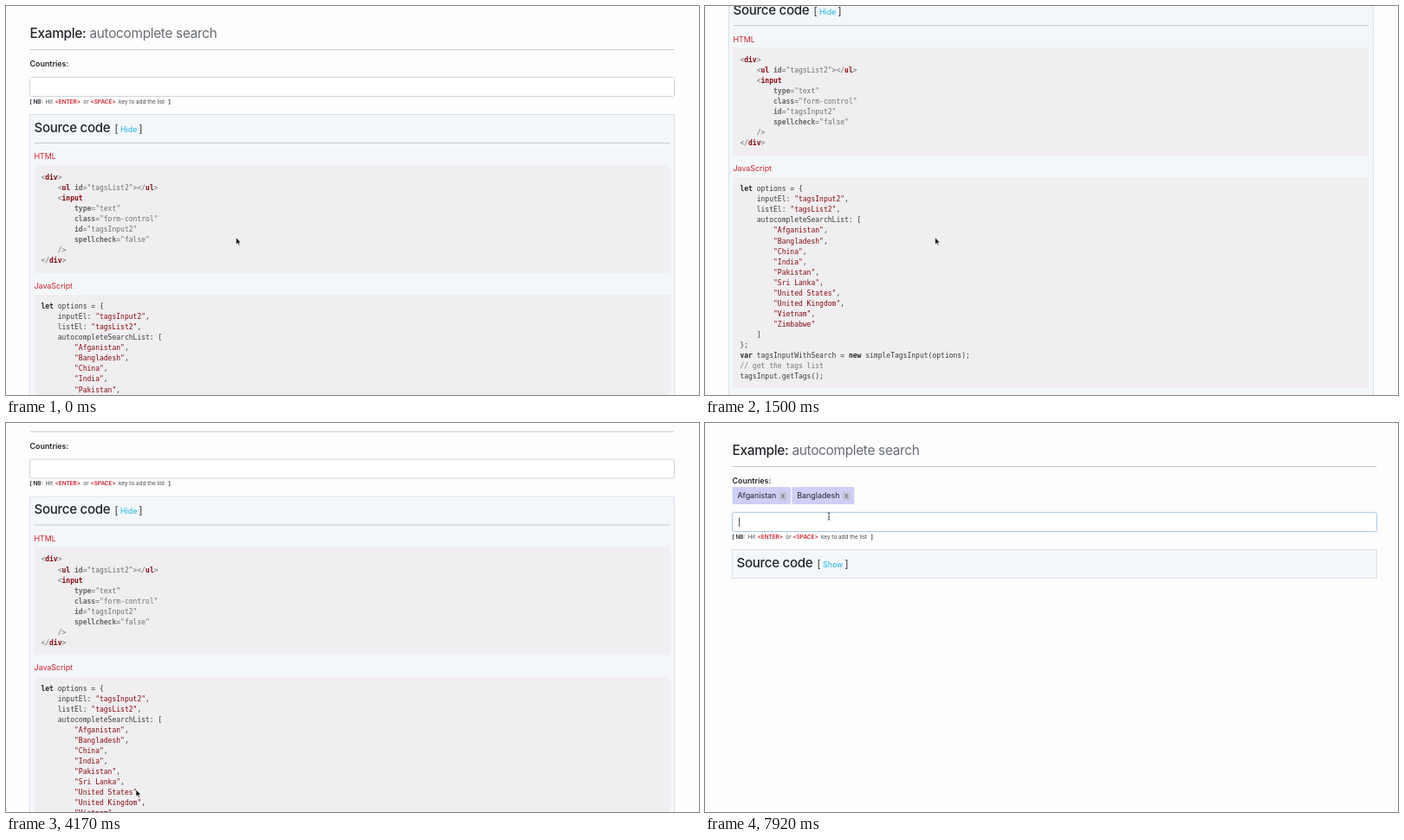
These frames come from a looping animation (800 by 450 pixels, 8000 ms). An HTML page:

```html
<!DOCTYPE html>
<html lang="en">
<head>
<meta charset="utf-8">
<title>Autocomplete search</title>
<style>
  html, body { margin: 0; width: 100%; height: 100%; overflow: hidden; background: #fefdfe; }
  svg { display: block; width: 800px; height: 450px; }
  text { font: 8.9px Inter, "Open Sans", sans-serif; fill: #212529; white-space: pre; }
  .title { font-size: 15.4px; letter-spacing: -.02em; }
  .medium { font-weight: 500; }
  .muted { fill: #666c72; }
  .bold { font-weight: 600; }
  .hint, .hint tspan { font-size: 6.4px; }
  .hint { fill: #44494e; }
  .hint .bold { fill: #212529; }
  .hint .red, .red { fill: #c8202c; }
  .link { fill: #1cb5e9; }
  .bracket { font-size: 11px; }
  .code { font: 8.02px "DejaVu Sans Mono", monospace; fill: #3c3c3c; }
  .markup { fill: #707070; }
  .name { fill: #850a10; font-weight: bold; }
  .attr { fill: #666; font-weight: bold; }
  .str { fill: #850a10; }
  .key { fill: #2a2a2a; font-weight: bold; }
  .note { fill: #777; }
  .rule { stroke: #c3c8cd; }
  .pre { fill: #f0eef0; }
  .head { font-weight: 700; font-style: italic; }
  .line { stroke: #dcdcdc; }
</style>
</head>
<body>
<svg viewBox="0 0 800 450">
  <g id="page">
    <text class="title" x="27.5" y="37.3"><tspan class="medium">Example:</tspan><tspan class="muted"> autocomplete search</tspan></text>
    <path class="rule" d="M27.5 50.5H771.5"/>
    <text class="bold" x="27.5" y="70.3">Countries:</text>
    <g id="tags"></g>

    <g id="lower">
      <text class="hint" y="113"><tspan class="bold" x="27.5">[ NB:</tspan><tspan x="45.6">Hit</tspan><tspan class="bold red" x="56.5">&lt;ENTER&gt;</tspan><tspan x="89.3">or</tspan><tspan class="bold red" x="97.4">&lt;SPACE&gt;</tspan><tspan x="130">key to add the list</tspan><tspan class="bold" x="187.6">]</tspan></text>
      <rect id="panel" x="27.5" y="125.5" width="744" height="33" fill="#f4f7fa" stroke="#d9e2e9"/>
      <text class="title medium" style="font-size:15.1px" x="32.5" y="146">Source code</text>
      <text y="146"><tspan class="bracket" x="125.6">[</tspan><tspan id="toggle" class="link" x="132">Hide</tspan></text>
      <text id="closer" class="bracket" x="153.6" y="146">]</text>
      <g id="source">
        <path class="rule" d="M32.5 158.5H766.5"/>
        <text class="red" x="32.5" y="177.4">HTML</text>
        <rect class="pre" x="32.5" y="184" width="734" height="125"/>
        <g id="markup"></g>
        <text class="red" x="32.5" y="327">JavaScript</text>
        <rect class="pre" x="32.5" y="334" width="734" height="244"/>
        <g id="script"></g>
      </g>
    </g>

    <g id="field">
      <rect id="glow" x="27.5" y="82.5" width="744" height="22" rx="2" fill="none" stroke="#007bff" stroke-width="4"/>
      <rect id="box" x="27.5" y="82.5" width="744" height="22" rx="2" fill="#fff"/>
      <text id="value" x="35" y="97.2"></text>
      <path id="caret" d="M35.5 88.5V99" stroke="#555"/>
      <g id="results"></g>
    </g>
  </g>

  <g id="pointer">
    <path id="arrow" d="M0 0V8.2L1.9 6.5 3.2 9.4 4.6 8.8 3.3 6H5.9Z" fill="#111" stroke="#fff" stroke-width=".7"/>
    <path id="ibeam" d="M-1.6-4.2Q0-4.2 0-3Q0-4.2 1.6-4.2M0-3V3M-1.6 4.2Q0 4.2 0 3Q0 4.2 1.6 4.2M-1 1H1" fill="none" stroke="#444" stroke-width=".8"/>
    <path id="hand" d="M-.8 0Q0-.9.8 0V3L4 3.8Q5 4.2 4.8 5.6L4 9.6H-.3L-3 6Q-3.4 4.8-2.2 5L-.8 6.2Z" fill="#fff" stroke="#333" stroke-width=".8"/>
  </g>
</svg>

<script>
const LOOP = 8000, FPS = 12;
const countries = ["Afganistan", "Bangladesh", "China", "India", "Pakistan",
  "Sri Lanka", "United States", "United Kingdom", "Vietnam", "Zimbabwe"];

const markup = `<div>
    <ul id="tagsList2"></ul>
    <input
        type="text"
        class="form-control"
        id="tagsInput2"
        spellcheck="false"
    />
</div>`;

const script = `let options = {
    inputEl: "tagsInput2",
    listEl: "tagsList2",
    autocompleteSearchList: [
${countries.map(c => `        "${c}"`).join(",\n")}
    ]
};
var tagsInputWithSearch = new simpleTagsInput(options);
// get the tags list
tagsInput.getTags();`;

const el = Object.fromEntries([...document.querySelectorAll("[id]")].map(n => [n.id, n]));
const escapeHtml = s => s.replace(/&/g, "&amp;").replace(/</g, "&lt;");

function highlight(line, rules) {
  let out = "", end = 0;
  for (const m of line.matchAll(rules)) {
    const kind = Object.keys(m.groups).find(k => m.groups[k]);
    out += escapeHtml(line.slice(end, m.index)) + `<tspan class="${kind}">${escapeHtml(m[0])}</tspan>`;
    end = m.index + m[0].length;
  }
  return out + escapeHtml(line.slice(end));
}

const codeBlock = (code, top, cls, rules) => code.split("\n").map((line, i) =>
  `<text class="code ${cls}" x="40.4" y="${top + i * 12.04}">${highlight(line, rules)}</text>`).join("");

el.markup.innerHTML = codeBlock(markup, 201, "markup", /(?<name>(?<=<\/?)\w+)|(?<attr>\w+(?==))/g);
el.script.innerHTML = codeBlock(script, 350.2, "", /(?<str>"[^"]*")|(?<key>\b(?:let|var|new)\b)|(?<note>\/\/.*)/g);

// Timeline: [time, value] steps and [time, x, y] pointer stops.
const typed = [[0, ""], [5660, "a"], [6580, ""], [7000, "b"], [7080, "ba"], [7250, "ban"], [7640, ""]];
const tagCount = [[0, 0], [6580, 1], [7640, 2]];
const focus = [[0, false], [5320, true], [6580, false], [6850, true], [7640, false], [7860, true]];
const shape = [[0, "arrow"], [2250, "ibeam"], [2750, "arrow"], [4780, "hand"], [5160, "ibeam"],
  [6080, "hand"], [6740, "ibeam"], [7400, "hand"], [7740, "ibeam"]];
const stops = [[1700, 265.5, 267.8], [2420, 69, 411], [2560, 69, 411], [2900, 44, 422], [3250, 160, 424],
  [3400, 150, 424], [4350, 150, 424], [4820, 142, 142], [4980, 142, 142], [5300, 183, 90],
  [5900, 183, 90], [6400, 88.5, 140], [6600, 88.5, 140], [6830, 120, 112], [7250, 120, 112],
  [7520, 100, 159], [7650, 100, 159], [7860, 143, 108]];
const COLLAPSE = 4900;

const clamp = v => Math.min(1, Math.max(0, v));
const smooth = v => v * v * (3 - 2 * v);
const mix = (a, b, u) => a + (b - a) * u;
const current = (steps, t) => steps.filter(s => s[0] <= t).pop();
const move = (node, x, y) => node.setAttribute("transform", `translate(${x} ${y})`);
const show = (node, on) => { node.style.display = on ? "" : "none"; };

function scrollAt(t) {
  if (t >= COLLAPSE) return 0;
  const down = 1 - (1 - clamp(t / 1853)) ** 2;
  const up = smooth(clamp((t - 3340) / 1280));
  return 141 * (down - up);
}

function pointerAt(t) {
  const i = stops.findIndex(s => s[0] > t);
  if (i === 0) return stops[0].slice(1);
  if (i < 0) return stops[stops.length - 1].slice(1);
  const [t0, x0, y0] = stops[i - 1], [t1, x1, y1] = stops[i];
  const u = smooth((t - t0) / (t1 - t0));
  return [mix(x0, x1, u), mix(y0, y1, u)];
}

function tagHtml(name, i) {
  const x = [27.5, 96.3][i], w = [67.6, 72][i];
  return `<rect x="${x}" y="74" width="${w}" height="20" rx="2" fill="#cfcef7"/>
    <text x="${x + 6}" y="87.4">${name}</text>
    <rect x="${x + w - 13.5}" y="79.5" width="9" height="10.5" rx="1" fill="#c6c6da"/>
    <text x="${x + w - 11.5}" y="87.2" fill-opacity=".65">x</text>`;
}

function resultsHtml(names, height, hoverY) {
  const overflow = (names.length + 1) * 20 > height;
  const right = overflow ? 763 : 771;
  const rows = names.slice(0, 5).map((name, i) => {
    const y = 128 + i * 20, hover = hoverY >= y && hoverY < y + 20;
    return `<rect x="28" y="${y + .5}" width="${right - 28}" height="${Math.min(20, 107.5 + height - y)}" fill="${hover ? "#f0f0f0" : "#fff"}"/>
      <path class="line" d="M28 ${y + .5}H${right}"/>
      <text class="${hover ? "bold" : ""}" x="31" y="${y + 13.3}">${name}</text>`;
  }).join("");
  const bar = overflow ? `<rect x="763" y="108" width="8" height="${height}" fill="#f9f9f9"/>
    <path class="line" d="M763.5 108V${108 + height}"/>
    <rect x="764.6" y="110" width="5.4" height="61" rx="2.7" fill="#bdbdbd"/>` : "";
  return `<clipPath id="view"><rect x="27" y="107" width="745" height="${height + 1}"/></clipPath>
    <g clip-path="url(#view)"><rect x="28" y="108" width="743" height="${height}" fill="#fff"/>
    <text class="head" x="31" y="121.3">Search Result:</text>${rows}${bar}</g>
    <rect x="27.5" y="107.5" width="744" height="${height}" fill="none" stroke="#cfd2d5"/>`;
}

function render(t) {
  const open = t < COLLAPSE;
  const [px, py] = pointerAt(t);
  const [typedAt, text] = current(typed, t);
  const count = current(tagCount, t)[1];
  const [focusAt, focused] = current(focus, t);
  const shift = count ? 21 : 0;
  const names = text ? countries.filter(c => c.toLowerCase().includes(text)) : [];
  const height = text ? Math.min(114, 20 * (names.length + 1)) : 0;

  move(el.page, open ? 0 : 4, -scrollAt(t));
  move(el.field, 0, shift);
  move(el.lower, 0, shift + (text ? height + 13 : 0));

  show(el.source, open);
  el.panel.setAttribute("height", open ? 520 : 33);
  el.toggle.textContent = open ? "Hide" : "Show";
  el.closer.setAttribute("x", open ? 153.6 : 157.4);

  el.tags.innerHTML = countries.slice(0, count).map(tagHtml).join("");
  el.results.innerHTML = text ? resultsHtml(names, height, py - shift) : "";
  el.value.textContent = text;

  const level = focused ? clamp((t - focusAt) / 150) : 0;
  const rgb = [[206, 128], [212, 189], [218, 255]].map(([a, b]) => Math.round(mix(a, b, level)));
  el.box.setAttribute("stroke", `rgb(${rgb})`);
  el.glow.setAttribute("stroke-opacity", .25 * level * level);
  show(el.caret, focused && (t - Math.max(focusAt, typedAt)) % 1000 < 500);
  move(el.caret, 5.2 * text.length, 0);

  const kind = current(shape, t)[1];
  for (const name of ["arrow", "ibeam", "hand"]) show(el[name], name === kind);
  move(el.pointer, px, py);
}

function tick(now) {
  const step = Math.floor((now % LOOP + 4) * FPS / 1000) % (LOOP * FPS / 1000);
  render(step * 1000 / FPS);
  requestAnimationFrame(tick);
}
render(0);
requestAnimationFrame(tick);
</script>
</body>
</html>
```
